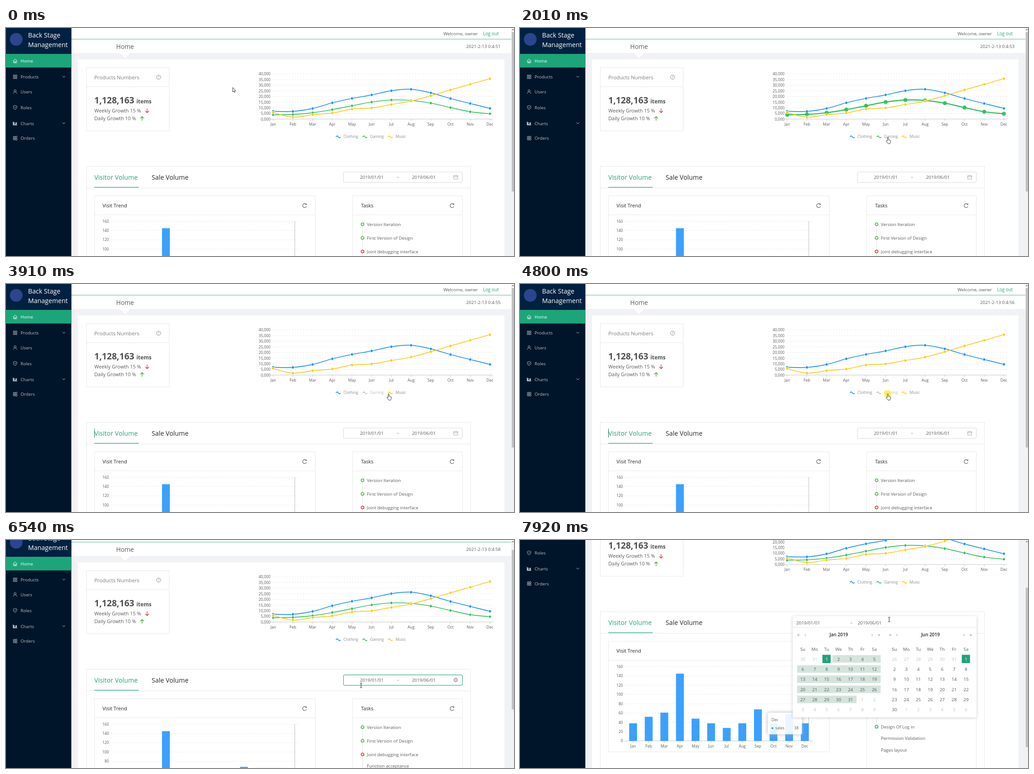
Animation, 1116 px wide and 502 px high, one loop 8000 ms. Source, as an HTML page:

```html
<!DOCTYPE html>
<html lang="en">
<head>
<meta charset="utf-8">
<title>Dashboard</title>
<style>
  html, body { margin: 0; height: 100%; overflow: hidden; background: #f0f2f5; }
  svg { display: block; width: 100vw; height: 100vh; font-family: "Open Sans", "Noto Sans", sans-serif; }
  text { white-space: pre; }
  .pop { filter: drop-shadow(0 0 4px #aeaeae); }
  .panel { filter: drop-shadow(0 1.5px 3px #0003); }
</style>
</head>
<body>
<svg id="stage" viewBox="0 0 1116 502"></svg>
<script>
const LOOP = 8000, TICK = 125.6, SCROLL = 146.6;
const GREEN = '#1da57a', TEXT = '#595959', DARK = '#262626', EDGE = '#e8e8e8';
const MEDIUM = 'font-weight="500"', BOLD = 'font-weight="700"';
const MONTHS = 'Jan Feb Mar Apr May Jun Jul Aug Sep Oct Nov Dec'.split(' ');
const SERIES = [
  { name: 'Clothing', color: '#1890ff', x: 725, data: [7, 6.9, 9.5, 14.5, 18.4, 21.5, 25.2, 26.5, 23.3, 18.3, 13.9, 9.6] },
  { name: 'Gaming', color: '#2fc25b', x: 783.5, data: [3.9, 4.2, 5.7, 8.5, 11.9, 15.2, 17, 16.6, 14.2, 10.3, 6.6, 4.8] },
  { name: 'Music', color: '#facc14', x: 839.5, data: [5.9, 1.8, 4, 5.5, 9, 10, 13, 16, 20.8, 25.9, 30.9, 35.9] }
];
const VISITS = [38, 52, 61, 145, 48, 38, 28, 38, 68, 38, 58, 38];

// [tick, x, y]
const POINTER = [
  [0, 498, 131], [1, 520, 137], [2, 597, 142], [3, 640, 152], [5, 690, 174], [7, 745, 181], [9, 791, 179],
  [10, 800, 179], [13, 824, 205], [15, 810, 240], [17, 806, 242], [20, 806, 242], [22, 830, 243], [24, 845, 241],
  [30, 846, 242], [36, 812, 242], [38, 808, 242], [46, 808, 242], [48, 790, 285], [50, 772, 328], [52, 780, 320],
  [54, 794, 240], [57, 804, 174], [60, 804, 174], [63, 811, 175]
];
const TIP = [[3, 606, 122], [5, 655, 122], [7, 705, 117], [9, 755, 113], [10, 768, 113], [13, 815, 130]];
const SCROLLING = [[51, 0], [52, 20], [53, 70], [54, 118], [55, 140], [56, SCROLL]];

const lerp = (a, b, u) => a + (b - a) * u;
const ramp = (n, a, b) => Math.max(0, Math.min(1, (n - a) / (b - a)));
function at(keys, n, col = 1) {
  let i = keys.findIndex(k => k[0] > n);
  if (i < 0) return keys[keys.length - 1][col];
  if (i === 0) return keys[0][col];
  const a = keys[i - 1], b = keys[i];
  return lerp(a[col], b[col], (n - a[0]) / (b[0] - a[0]));
}

const text = (x, y, s, size, fill = TEXT, more = '') =>
  `<text x="${x}" y="${y}" font-size="${size}" fill="${fill}" ${more}>${s}</text>`;
const mid = (x, y, s, size, fill, more = '') => text(x, y, s, size, fill, 'text-anchor="middle" ' + more);
const end = (x, y, s, size, fill) => text(x, y, s, size, fill, 'text-anchor="end"');
const rect = (x, y, w, h, fill, more = '') =>
  `<rect x="${x}" y="${y}" width="${w}" height="${h}" fill="${fill}" ${more}/>`;
const path = (d, stroke, w = 1, more = '') =>
  `<path d="${d}" fill="none" stroke="${stroke}" stroke-width="${w}" ${more}/>`;
const dot = (x, y, r, fill, more = '') => `<circle cx="${x}" cy="${y}" r="${r}" fill="${fill}" ${more}/>`;
const frame = (x, y, w, h, stroke = EDGE, more = '') => rect(x + .5, y + .5, w, h, 'none', `stroke="${stroke}" ${more}`);
const move = (x, y, body) => `<g transform="translate(${x} ${y})">${body}</g>`;

function smooth(p) {
  const k = .19;
  return p.map(([x, y], i) => {
    if (!i) return `M${x} ${y}`;
    const b = p[i - 1], a = p[i - 2] || b, d = p[i + 1] || p[i];
    return `C${b[0] + (x - a[0]) * k} ${b[1] + (y - a[1]) * k} ${x - (d[0] - b[0]) * k} ${y - (d[1] - b[1]) * k} ${x} ${y}`;
  }).join('');
}

function sidebar() {
  const items = [
    ['Home', 72.5, 'M-4.8 .2L0-4.2 4.8.2M-3.3-.8V4.2H3.3V-.8M-1 4V1H1V4'],
    ['Products', 107.5, 'M-4-4H-.8V-.8H-4ZM.8-4H4V-.8H.8ZM-4 .8H-.8V4H-4ZM.8 .8H4V4H.8Z'],
    ['Users', 140, 'M0-4.2A2.3 2.3 0 1 1 0 .4 2.3 2.3 0 1 1 0-4.2M-4 4.5C-4-.6 4-.6 4 4.5'],
    ['Roles', 175, 'M0-4.4L3.8-3V.8Q3 3.2 0 4.4-3 3.2-3.8 .8V-3ZM-1.8-.2L-.4 1.2 1.9-1.5'],
    ['Charts', 210, 'M-4.5-4V3.8H4.8M-2.5 2V0L-.5-2 1 0 3.5-2.5V2Z'],
    ['Orders', 242.5, 'M-4-3.6L-.6-4V-.7H-4ZM.8-4L4-4.3V-.7H.8ZM-4 .7H-.6V4L-4 3.6ZM.8 .7H4V4.3L.8 4Z']
  ];
  return rect(0, 0, 143.5, 700, '#001529') + rect(0, 0, 143.5, 57, '#002140') + rect(0, 57, 143.5, 30, GREEN) +
    dot(22.5, 25, 14, '#2b458f') +
    text(48.5, 20.5, 'Back Stage', 14.1, '#fff', MEDIUM) + text(48.5, 42, 'Management', 14.1, '#fff', MEDIUM) +
    items.map(([name, y, icon], i) => {
      const c = i ? '#bac0c6' : '#fff';
      return move(20, y, path(icon, c, .9, i === 4 ? `style="fill:${c}"` : '')) + text(32, y + 3.7, name, 9.7, c) +
        (i === 1 || i === 4 ? path(`M124 ${y - 2}l3 3 3-3`, c, 1) : '');
    }).join('');
}

function header(n) {
  const sec = n < 1 ? 51 : Math.min(59, 52 + Math.floor((n - 1) / 7.6));
  return rect(143, 0, 967, 55, '#fff') + rect(143, 24, 967, 1, '#4fb897') +
    text(961, 15.5, 'Welcome, owner', 9.8) + text(1048, 15.5, 'Log out', 9.9, GREEN) +
    mid(261.5, 46, 'Home', 13.8) + text(1011, 44, '2021-2-13 0:4:' + sec, 9.8) +
    '<path d="M250 55h23l-11.5 11z" fill="#fff"/>';
}

const productCard = () => frame(176, 87, 182, 139) + path('M176 129.5H359', EDGE) +
  text(194, 112.5, 'Products Numbers', 11.3, '#7b7b7b') + dot(335.3, 108.3, 4.6, 'none', 'stroke="#7b7b7b" stroke-width=".9"') +
  mid(335.3, 111, '?', 7.5, '#777') +
  text(194, 166, '1,128,163', 19.2, '#505050', BOLD) + text(286.5, 166, 'items', 11.8, '#505050', BOLD) +
  text(194, 185.5, 'Weekly Growth 15 %', 10.8) + text(194, 203, 'Daily Growth 10 %', 10.8) +
  path('M310 177.5V186.5M306 182.5L310 186.5 314 182.5', '#cf2a1e', 1.2) +
  path('M299 204V195M295 199L299 195 303 199', '#3f9c22', 1.2);

const lineX = i => 587 + i * 43.28, lineY = v => 200.8 - v * 2.4875;

function lineChart(n) {
  const off = n > 19 && n < 39;
  const lit = (n >= 15 && n <= 19) || (n >= 40 && n < 47) ? 1 : n >= 23 && n <= 30 ? 2 : -1;
  let s = '';
  for (let v = 0; v <= 40; v += 5) {
    const y = lineY(v);
    s += end(581, y + 3.1, (v ? v : '0') + ',000', 8.4);
    if (v) s += path(`M580 ${y}H1070`, EDGE, 1, 'stroke-dasharray="3 3"');
  }
  s += path('M580 200.5H1070', '#c4c4c4');
  MONTHS.forEach((m, i) => s += path(`M${lineX(i)} 200.5v4`, '#c4c4c4') + mid(lineX(i), 215, m, 8.5));
  const tipOn = n >= 3 && n < 14;
  const month = Math.round((at(POINTER, n) - 587) / 43.28);
  if (tipOn) s += path(`M${lineX(month)} 101V200.5`, '#bdbdbd');

  s += `<clipPath id="sweep">${rect(575, 90, 500 * ramp(n, 38, 42), 130, '#000')}</clipPath>`;
  SERIES.forEach(({ name, color, x, data }, k) => {
    const big = k === lit, pts = data.map((v, i) => [lineX(i), lineY(v)]);
    const curve = path(smooth(pts), color, big ? 2.5 : 1.7) + pts.map(([a, b]) => big
      ? dot(a, b, 4.6, color, 'opacity=".8"') + dot(a, b, 3.2, color)
      : dot(a, b, 3, color, 'stroke="#fff" stroke-width=".8"')).join('');
    if (k !== 1) s += curve;
    else if (n < 38) s += `<g opacity="${1 - ramp(n, 19, 21)}">${curve}</g>`;
    else s += `<g clip-path="url(#sweep)">${curve}</g>`;
    const grey = k === 1 && off;
    s += path(`M${x} 240q2.5-4.4 5-.4t5 .4`, grey ? '#bfbfbf' : color, 1.7) +
      text(x + 16.3, 242.2, name, 8.4, grey ? '#bfbfbf' : '#8c8c8c');
  });
  if (tipOn) s += move(at(TIP, n), at(TIP, n, 2),
    rect(0, 0, 97, 83, '#fff', 'rx="2" opacity=".9" class="pop"') + text(8, 18, MONTHS[month], 8.5) +
    SERIES.map(({ name, color, data }, k) => dot(10, 34 + k * 17.5, 2, color) +
      text(17, 36 + k * 17.5, name, 8.5) + end(89, 36 + k * 17.5, data[month], 8.5)).join(''));
  return s;
}

const reload = (x, y) => path(`M${x + 3.6} ${y - 2.6}A4.4 4.4 0 1 0 ${x + 4.2} ${y + 1.6}`, '#555', 1.1) +
  path(`M${x + 4.2} ${y - 4.6}v2.6h-2.6`, '#555', 1);

function barChart() {
  const top = 425.5, base = 589, y = v => lerp(base, top, v / 160), x = i => 248.5 + i * 34.27;
  let s = frame(194, 369, 485, 243.5) + path('M194 411.5H680', EDGE) +
    text(212, 395, 'Visit Trend', 11.1, DARK, MEDIUM) + reload(656, 391);
  for (let v = 0; v <= 160; v += 20) {
    s += end(226, y(v) + 3, v, 8.4);
    if (v) s += path(`M231 ${y(v)}H643`, EDGE, 1, 'stroke-dasharray="3 3"');
  }
  s += path(`M231 ${base}H643`, '#c4c4c4');
  MONTHS.forEach((m, i) => s += path(`M${x(i)} ${base}v4`, '#c4c4c4') + mid(x(i), 603.7, m, 8.5) +
    rect(x(i) - 8.6, y(VISITS[i]), 17.2, base - y(VISITS[i]), '#3ba0ff'));
  s += path(`M634.5 ${top}V${base}`, '#bdbdbd');
  return s + move(544.5, 526.8, rect(0, 0, 75, 47.5, '#fff', 'rx="2" opacity=".9" class="pop"') +
    text(8, 18.5, 'Dec', 8.5) + dot(10, 34, 2, '#1890ff') + text(16.5, 36.5, 'sales', 8.5) + end(67.5, 36.5, 38, 8.5));
}

function tasks() {
  const list = [
    ['Version Iteration', 432, '#3bb52f'], ['First Version of Design', 462, '#3bb52f'],
    ['Joint debugging interface', 492, '#d8302c'], ['Function acceptance', 517.8],
    ['Design Of Log in', 557.8, GREEN], ['Permission Validation', 583.5], ['Pages layout', 608.8]
  ];
  return frame(761, 369, 241, 320) + path('M761 411.5H1003', EDGE) +
    text(780, 395, 'Tasks', 10.8, DARK, MEDIUM) + reload(980, 391) +
    path('M783.3 432V558', EDGE, 1.4) +
    list.map(([s, y, c]) => (c ? dot(783.3, y, 3.1, '#fff', `stroke="${c}" stroke-width="1.5"`) : '') +
      text(792.8, y + 3.6, s, 9.7)).join('');
}

function volume(n) {
  const hover = ramp(n, 48, 52);
  const blinkFrom = n >= 38 ? 38 : 19;
  const caret = n >= 19 && n < 59 && Math.floor((n - blinkFrom) / 4.22) % 2 === 0;
  return frame(176, 304, 844, 400) + path('M176 352H1021', EDGE) + rect(194, 350, 97.5, 1.2, GREEN) +
    text(194, 334, 'Visitor Volume', 14.15, GREEN, MEDIUM) + text(320, 334, 'Sale Volume', 14.15, DARK, MEDIUM) +
    (caret ? rect(194, 318.5, 1, 19.5, '#14704f') : '') +
    frame(741, 316.5, 261, 23, '#d9d9d9', 'rx="2"') + frame(741, 316.5, 261, 23, GREEN, `rx="2" opacity="${hover}"`) +
    text(777.5, 332.3, '2019/01/01', 9.8) + text(858, 332, '~', 9.8, '#8c8c8c') + text(892, 332.3, '2019/06/01', 9.8) +
    `<g opacity="${1 - hover}">${path('M983.5 325h9v7.5h-9zM983.5 327.7h9M986 323.5v2.5M990 323.5v2.5', '#a6a6a6', .9)}</g>` +
    `<g opacity="${hover}">${dot(988, 328.2, 4.9, '#bdbdbd')}${path('M986.3 326.5l3.4 3.4m0-3.4l-3.4 3.4', '#fff')}</g>`;
}

function calendar(x0, title, lead, days, range) {
  const dx = 26.2, dy = 22.3;
  let s = mid(x0 + 79, 212, title, 10, DARK, 'font-weight="600"');
  [['«', -9.5], ['‹', 5.5], ['›', 152.5], ['»', 167.5]].forEach(([c, x]) => s += mid(x0 + x, 212, c, 11, '#8c8c8c'));
  'Su Mo Tu We Th Fr Sa'.split(' ').forEach((d, i) => s += mid(x0 + i * dx, 244, d, 9.7));
  if (range) for (let r = 0; r < 5; r++) {
    const a = r ? x0 - 12.5 : x0 + 65, b = r < 4 ? x0 + 171 : x0 + 118;
    s += rect(a, 253.5 + r * dy, b - a, 16.6, '#d3e4dd');
  }
  for (let i = 0; i < 42; i++) {
    const d = i - lead + 1, inside = d > 0 && d <= days;
    const x = x0 + i % 7 * dx, y = 262 + Math.floor(i / 7) * dy;
    if (d === 1) s += rect(x - 9.4, y - 9.3, 18.2, 18.2, GREEN, 'rx="1"');
    s += mid(x, y + 3.6, d < 1 ? d + 31 : inside ? d : d - days, 9.8, d === 1 ? '#fff' : inside ? TEXT : '#c2c2c2');
  }
  return s;
}

function picker(n) {
  if (n < 60) return '';
  const u = ramp(n, 59, 61), k = lerp(.87, 1, u);
  return `<g opacity="${u}" transform="translate(0 ${167 * (1 - k)}) scale(1 ${k})">` +
    rect(599, 167.5, 404, 223, '#fff', 'rx="2" class="panel"') + path('M599 192.5H1003', EDGE) +
    text(607, 186, '2019/01/01', 9.8) + text(725, 186, '~', 9.8, '#8c8c8c') + text(742, 186, '2019/06/01', 9.8) +
    calendar(621.3, 'Jan 2019', 2, 31, true) + calendar(822.7, 'Jun 2019', 6, 30, false) + '</g>';
}

function pointer(n) {
  const halo = (n >= 18 && n <= 20) || (n >= 37 && n <= 39) || n === 58 || n === 59;
  const ink = 'stroke="#222" stroke-width=".9" stroke-linejoin="round"';
  let shape;
  if ((n >= 8 && n <= 10) || n >= 49)
    shape = path('M-2.3-5Q0-5 0-4 0-5 2.3-5M0-4V4.3M-2.3 5.3Q0 5.3 0 4.3 0 5.3 2.3 5.3', '#222');
  else if (n >= 14 && n < 48)
    shape = `<path d="M-1 8V1a1.1 1.1 0 0 1 2.2 0V5L5 6q1.3.4 1.2 1.8L5.6 11.5 4.6 13.7H.6L-3.6 8.6Q-3.7 7-2.2 7.4Z" fill="#fff" ${ink}/>`;
  else
    shape = `<path d="M0 0V9.6L2.3 7.7 3.8 10.8 5.3 10.1 3.9 7H6.5Z" fill="#fff" ${ink}/>`;
  return move(at(POINTER, n), at(POINTER, n, 2), (halo ? dot(0, 0, 8.3, '#fff000', 'opacity=".65"') : '') + shape);
}

function scene(n) {
  const y = at(SCROLLING, n);
  return rect(0, 0, 1116, 502, '#f0f2f5') +
    move(0, -y, rect(158, 69, 937, 640, '#fff') + header(n) + sidebar() + productCard() + lineChart(n) +
      volume(n) + barChart() + tasks()) +
    rect(1110, 0, 6, 502, '#f1f1f1') + rect(1111, 9 + y * .655, 5, 351, '#c1c1c1') +
    '<path d="M1111 4.5l2.5-2.5 2.5 2.5z" fill="#707070"/>' + picker(n) + pointer(n);
}

const stage = document.getElementById('stage');
let shown = -1;
function draw(now) {
  const n = Math.floor((now % LOOP + 22) / TICK);
  if (n !== shown) stage.innerHTML = scene(shown = n);
  requestAnimationFrame(draw);
}
draw(0);
</script>
</body>
</html>
```
